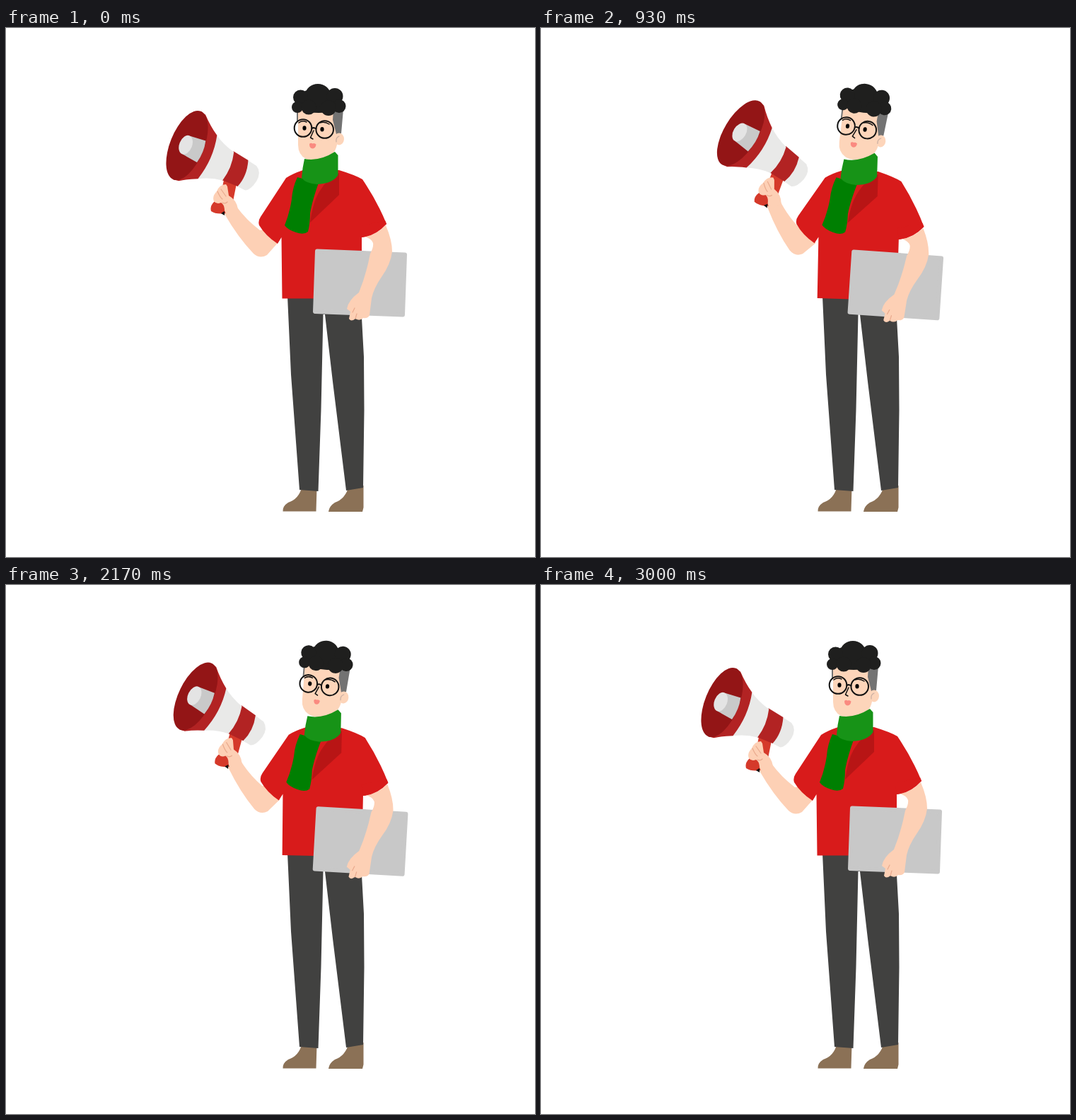
An HTML page that plays this animation: 748 px wide and 748 px high, repeating every 3030 ms.

```html
<!DOCTYPE html>
<html lang="en">
<head>
<meta charset="utf-8">
<title>Man with a megaphone</title>
<style>
  html, body { margin: 0; width: 100%; height: 100%; overflow: hidden; background: #fff; }
  svg { display: block; width: 100vw; height: 100vh; }
  .skin { fill: #fdd0b5; }
  .face { fill: #fdd5ba; }
  .red { fill: #d81b1b; }
  .band { fill: #b22323; }
  .pale { fill: #e9e9e8; }
  .hair { fill: #1f1f1e; }
  .line { fill: none; stroke: #111; stroke-linecap: round; stroke-linejoin: round; }
  .crease { fill: none; stroke: #e9aa8e; stroke-width: 1.2; stroke-linecap: round; }
</style>
</head>
<body>
<svg viewBox="0 0 748 748">
  <!-- shoes and legs -->
  <g fill="#8b7156">
    <path d="M391.500 683.500Q391 676 399 671Q414 666 418 650H439.500L438.500 683.500Z"/>
    <path d="M456 684Q457 676 465 671Q480 666 485 647H505.500V678L504 684Z"/>
  </g>
  <path fill="#414140" d="M398 379H502L503 410L506 465L506.500 540L505 650L481 654L462 500L451 405H448.500L445.500 540L441.500 655L415 653L403 490Z"/>

  <g id="body">
    <g id="arm">
      <path class="skin" d="M309 263Q328 296 350 319Q359 327 369 321L385 303L372 284L359 286Q338 270 325 251Z"/>
      <path fill="#d5392a" d="M308 215L326 220L321 245L311 262Q297 264 290 259Q288 252 294 246L303 239Z"/>
      <path fill="#111" d="M304 262L309 259L309 265Z"/>
      <path class="skin" d="M311 221Q302 221 298 231Q291 238 294 245Q298 250 304 247Q309 250 309 258L313 268L328 256Q326 243 315 237L313 224Z"/>
      <path class="crease" d="M299 231Q303 240 306 242M304 228L311 238M306 247Q310 249 313 246"/>
      <g transform="translate(256 166) rotate(22)">
        <path class="pale" d="M86 -13L102 -10Q112 -4 110 10Q107 25 100 28L86 27Z"/>
        <path class="band" d="M64 -17L88 -13Q95 8 88 27L64 27Z"/>
        <path class="pale" d="M32 -30Q48 -20 65 -16Q71 6 65 27Q48 29 32 38Z"/>
        <path class="band" d="M0 -52L8 -50Q20 -38 34 -29Q42 4 32 38Q16 45 8 51L0 52Z"/>
        <ellipse rx="24" ry="52" fill="#931516"/>
        <path fill="#c9c9c9" d="M-1 -14L22 -16Q26 0 22 17L-1 14Z"/>
        <ellipse cx="-2" rx="9" ry="14" fill="#e4e4e4"/>
      </g>
    </g>

    <path class="red" d="M420 201Q405 206 396 212L360 267Q356 273 358 279Q367 294 384 305L389.500 296L390.500 382.500H503V296Q523 293 538 277Q525 245 504 214Q494 208 471 201Z"/>
    <path fill="#b81515" d="M471 205V236L430 275Q434 245 444 230Q455 212 471 205Z"/>

    <g id="head">
      <path fill="#737373" d="M411 115H477L474 149L463 152L460 125L414 126L413 133H411Z"/>
      <ellipse class="face" cx="471" cy="157" rx="7" ry="8.5"/>
      <path class="face" d="M413 115H463L462 130L467 150L468 165Q465 180 450 185Q434 190 424 185Q413 179 413 165Z"/>
      <path class="crease" style="stroke:#c9aea2" d="M467 161Q466 155 471 153"/>
      <g class="hair">
        <ellipse cx="442" cy="103" rx="33" ry="17"/>
        <ellipse cx="441" cy="95" rx="18" ry="16"/>
        <circle cx="416.500" cy="98" r="10.5"/>
        <circle cx="465" cy="96.500" r="11.5"/>
        <circle cx="412" cy="112" r="8"/>
        <circle cx="471" cy="110.500" r="9.5"/>
        <circle cx="428" cy="112" r="10.5"/>
        <circle cx="456" cy="113" r="11"/>
      </g>
      <g class="line" stroke-width="2">
        <circle cx="420" cy="141.500" r="12.3"/>
        <circle cx="450.700" cy="143.500" r="12.3"/>
        <path d="M432.500 142Q435 140 438.500 142.500"/>
        <path stroke-width="1.5" d="M414 134Q419 130 425 133M444 134Q451 132 457 136M435 145L430.500 155L434 157"/>
      </g>
      <ellipse cx="422" cy="141.500" rx="2.6" ry="3.2"/>
      <ellipse cx="447" cy="143.300" rx="2.6" ry="3.2"/>
      <path id="mouth" fill="#fa8a80" d="M429 164Q431 162 433.500 163.500Q436 162 438.500 164.500Q438 170 433.500 170.500Q429 170 429 164Z"/>
    </g>

    <path fill="#007f02" d="M412 211Q405 226 404 242Q401 262 394 279Q398 285 410 289Q421 293 427 288Q430 276 430 262Q433 244 442 219Z"/>
    <path fill="#179317" d="M422 185Q443 189 465 175L469.500 180V208Q462 220 440 221Q424 220 418 212Q419 198 422 185Z"/>

    <path fill="#c8c8c8" stroke="#c8c8c8" stroke-width="6" stroke-linejoin="round" d="M440 315.500L564 320.500L561 405.500L437 401Z"/>
    <path class="skin" d="M507 295Q523 293 537 279Q546 300 546 316Q544 334 531 352Q520 368 517 382L514 406Q512 411 505 410Q500 415 494 411Q488 416 485 411L487 401L482 397Q484 385 499 374Q509 350 515 319Q520 310 519 304Q517 298 507 295Z"/>
    <path class="crease" d="M490 402L493 396M494 411L496 404"/>
    <path class="red" d="M500 280L536 272L538 277Q523 294 503 296Z"/>
  </g>
</svg>
<script>
const LOOP = 3030;
const SWAY = [[0, 0], [600, 1], [1650, 1], [3005, 0]];
const ARM = [[0, 0], [380, .88], [560, .88], [900, 1.09], [960, 1.09], [1960, .08], [2570, 1.36], [3000, 0]];
const parts = Object.fromEntries(['body', 'arm', 'head', 'mouth'].map(id => [id, document.getElementById(id)]));

// Value at time t, eased with a cosine between neighbouring keys.
function at(keys, t) {
  const i = keys.findIndex(k => k[0] > t);
  if (i < 0) return keys[keys.length - 1][1];
  const [t0, v0] = keys[i - 1], [t1, v1] = keys[i];
  return v0 + (v1 - v0) * (1 - Math.cos(Math.PI * (t - t0) / (t1 - t0))) / 2;
}

function turn(part, angle, x, y) {
  part.setAttribute('transform', `rotate(${angle} ${x} ${y})`);
}

function draw(now) {
  const t = now % LOOP;
  const sway = at(SWAY, t);
  turn(parts.body, 1.8 * sway, 410, 388);
  turn(parts.head, 5 * sway, 462, 182);
  turn(parts.arm, 6.6 * at(ARM, t), 372, 312);
  const open = .76 + .24 * Math.cos(6 * Math.PI * t / LOOP);
  parts.mouth.setAttribute('transform', `translate(433.5 165) scale(${open}) translate(-433.5 -165)`);
  requestAnimationFrame(draw);
}
draw(0);
</script>
</body>
</html>
```
